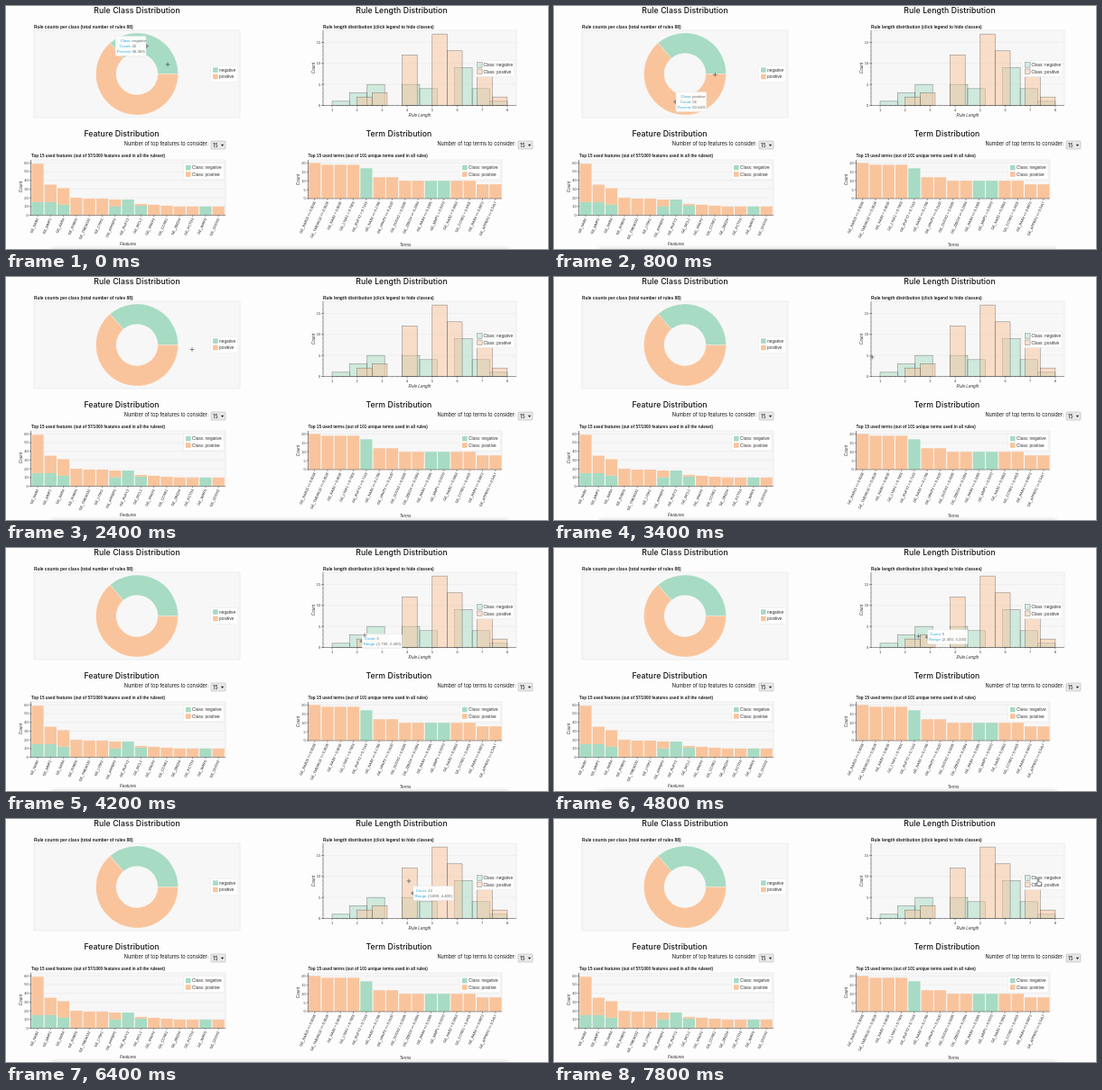
Animation, 600 px wide and 270 px high, one loop 8 s. Source, as an HTML page:

```html
<!DOCTYPE html>
<html lang="en">
<head>
<meta charset="utf-8">
<title>Rule statistics</title>
<style>
html, body { margin: 0; width: 100%; height: 100%; overflow: hidden; background: #fdfdfd; }
svg { display: block; width: 600px; height: 270px; }
text { font: 4.75px "Liberation Sans", Arial, sans-serif; fill: #333; }
.head { font: 500 8.7px Inter, "Open Sans", sans-serif; letter-spacing: .08px; fill: #111; text-anchor: middle; }
.ask { font: 5.55px Inter, "Open Sans", sans-serif; fill: #111; text-anchor: end; }
.pick { font: 5.6px Inter, "Open Sans", sans-serif; fill: #111; }
.sub { font-weight: bold; font-size: 4.85px; fill: #222; }
.small { font-weight: bold; font-size: 4.6px; fill: #222; }
.axis { font-style: italic; font-size: 4.6px; text-anchor: middle; }
.tick { font-size: 4px; text-anchor: end; }
.mid { font-size: 4px; text-anchor: middle; }
.name { font-size: 3.85px; fill: #111; text-anchor: end; }
.key { font-size: 4.3px; fill: #26aae1; text-anchor: end; }
.val { font-size: 4.3px; fill: #666; }
</style>
</head>
<body>
<svg id="stage" viewBox="0 0 600 270"></svg>
<script>
const GREEN = "#a7dbc3", ORANGE = "#f9c49c", PANEL = "#f7f7f7", RULE = "#e4e4e4", INK = "#444";
const CLASSES = ["Class: negative", "Class: positive"];
const stage = document.getElementById("stage");

function add(tag, attrs, parent = stage) {
  const el = document.createElementNS("http://www.w3.org/2000/svg", tag);
  for (const k in attrs) el.setAttribute(k, attrs[k]);
  return parent.appendChild(el);
}
function label(str, x, y, cls = "", parent = stage, turn = 0) {
  add("text", { x, y, class: cls, transform: `rotate(${turn} ${x} ${y})` }, parent).textContent = str;
}
function box(x, y, width, height, fill, more = {}, parent = stage) {
  add("rect", { x, y, width, height, fill, ...more }, parent);
}
function line(x1, y1, x2, y2, stroke = INK, width = 0.5) {
  add("line", { x1, y1, x2, y2, stroke, "stroke-width": width });
}
// Straight interpolation through points of the form [position, value, value...]
function along(points, at) {
  const i = points.findIndex(p => p[0] > at);
  if (i < 0) return points[points.length - 1].slice(1);
  const a = points[i - 1], b = points[i], k = (at - a[0]) / (b[0] - a[0]);
  return a.slice(1).map((v, j) => v + (b[j + 1] - v) * k);
}
function seeded(seed) {
  return () => (seed = seed * 16807 % 2147483647) / 2147483647;
}

function panel(x, y, w, h) {
  box(x, y, w, h, PANEL, { stroke: RULE, "stroke-width": 0.6 });
}
function legend(x, y, w, names, more = {}) {
  box(x, y, w, 18, "#fff", { "fill-opacity": 0.95, stroke: RULE, "stroke-width": 0.4 });
  names.forEach((name, i) => {
    box(x + 2.5, y + 2 + i * 7.4, 5.6, 5.6, i ? ORANGE : GREEN, more);
    label(name, x + 9.6, y + 6.5 + i * 7.4);
  });
}
// Vertical scale: grid, labelled ticks and small ticks between them
function scaleY(x, right, top, base, unit, step, max) {
  for (let v = 0; v <= max; v += step) {
    const y = base - v * unit;
    if (v) line(x, y, right, y, RULE);
    line(x - 2, y, x + 1, y);
    label(v, x - 2.8, y + 1.4, "tick");
  }
  for (let y = base; y > top; y -= step / 5 * unit) line(x - 1, y, x, y, INK, 0.3);
}
function frame(x, top, right, base) {
  line(x, top, x, base);
  line(x, base, right, base);
}
function chooser(str, x) {
  label(str, x - 2.5, 155.1, "ask");
  box(x, 150, 16, 9, "#e9e9e9", { stroke: "#aaa", "stroke-width": 0.5, rx: 0.8 });
  label("15", x + 2, 156.5, "pick");
  add("path", { d: `M${x + 10.8} 153.8h3.4l-1.7 2.2z`, fill: "#222" });
}

// Donut
const ring = { x: 145, y: 75.5, out: 45.5, in: 23 };
const split = 32 / 88 * 2 * Math.PI;
const polar = (r, a) => `${ring.x + r * Math.cos(a)} ${ring.y - r * Math.sin(a)}`;
function wedge(a, b, fill) {
  const big = b - a > Math.PI ? 1 : 0;
  add("path", {
    d: `M${polar(ring.out, a)}A${ring.out} ${ring.out} 0 ${big} 0 ${polar(ring.out, b)}` +
       `L${polar(ring.in, b)}A${ring.in} ${ring.in} 0 ${big} 1 ${polar(ring.in, a)}Z`,
    fill, stroke: "#fff", "stroke-width": 0.25
  });
}
label("Rule Class Distribution", 145, 7.5, "head");
label("Rule counts per class (total number of rules 88)", 31, 25, "sub");
panel(31, 27, 228, 97);
wedge(0, split, GREEN);
wedge(split, 2 * Math.PI, ORANGE);
legend(226.5, 66.3, 30, ["negative", "positive"]);

// Rule length histogram
const hist = { left: 351, right: 565, top: 27, base: 110.5, unit: 4.67, middle: 458 };
const histX = v => 361 + (v - 1) * 27.7;
const bins = [];
const outline = { "fill-opacity": 0.5, stroke: "#333", "stroke-opacity": 0.6, "stroke-width": 0.5 };
function histogram(start, step, counts, fill) {
  counts.forEach((n, i) => {
    if (!n) return;
    const from = start + i * step, to = from + step;
    const b = { n, from, to, x: histX(from), w: step * 27.7, h: n * hist.unit };
    b.y = hist.base - b.h;
    bins.push(b);
    box(b.x, b.y, b.w, b.h, fill, outline);
  });
}
label("Rule Length Distribution", 438, 7.5, "head");
label("Rule length distribution (click legend to hide classes)", 351, 25, "sub");
panel(hist.left, hist.top, 214, 83.5);
scaleY(hist.left, hist.right, hist.top, hist.base, hist.unit, 5, 15);
histogram(1, 0.7, [1, 3, 5, 0, 5, 4, 0, 9, 4, 1], GREEN);
histogram(2, 0.6, [2, 3, 0, 12, 0, 17, 13, 0, 7, 2], ORANGE);
frame(hist.left, hist.top, hist.right, hist.base);
for (let i = 5; i <= 40; i++) {
  const x = histX(i / 5), whole = i % 5 === 0;
  line(x, hist.base, x, hist.base + (whole ? 2 : 1), INK, whole ? 0.5 : 0.3);
  if (whole) label(i / 5, x, 117, "mid");
}
label("Count", 341.5, 69, "axis", stage, -90);
label("Rule Length", hist.middle, 122.9, "axis");
legend(519, 60.6, 43.5, CLASSES, outline);

// Ranked bars: totals follow a curve, green(i) gives the green part
function bars(x, base, unit, curve, green, names) {
  const pitch = 14.3;
  names.forEach((name, i) => {
    const n = Math.floor(along(curve, i)[0] + 1e-6), g = Math.min(n, green(i));
    const left = x + 0.6 + i * pitch, mid = x + (i + 0.5) * pitch;
    box(left, base - n * unit, pitch - 1.1, (n - g) * unit, ORANGE);
    box(left, base - g * unit, pitch - 1.1, g * unit, GREEN);
    line(mid, base, mid, base + 2);
    label("GE_" + name, mid + 1.2, base + 4, "name", stage, -66);
  });
}

label("Feature Distribution", 128, 145.3, "head");
chooser("Number of top features to consider:", 227);
label("Top 15 used features (out of 57/1000 features used in all the ruleset)", 28, 168.3, "small");
panel(27.5, 171, 215.5, 61.5);
scaleY(27.5, 243, 171, 232.5, 0.97, 10, 60);
const features = "NAB2 MMP1 RAB4 RAB25 TMEM132 LY6K1 APPBP2 RUFY2 MCL1 VRKP2 CCNE1 ZBED4 KCTD3 WARS DUOX2".split(" ");
const shared = { NAB2: 15, MMP1: 15, RAB4: 12, APPBP2: 10, RUFY2: 18, MCL1: 11, WARS: 10 };
bars(27.8, 232.5, 0.97,
  [[0, 59], [1, 35], [2, 31], [3, 20], [7, 18], [8, 13], [11, 10]],
  i => shared[features[i]] || 0, features);
frame(27.5, 171, 243, 232.5);
label("Count", 18, 201, "axis", stage, -90);
label("Features", 135, 266.3, "axis");
legend(196.5, 174.8, 44.5, CLASSES);

label("Term Distribution", 435, 145.3, "head");
chooser("Number of top terms to consider:", 567);
label("Top 15 used terms (out of 101 unique terms used in all rules)", 334.5, 168.3, "small");
panel(334.5, 171, 214.5, 43);
scaleY(334.5, 549, 171, 214, 1.98, 5, 20);
const random = seeded(35);
const terms = "RAB25 TMEM132 NAB2 LY6K1 RUFY2 NAB2 VRKP2 DUOX2 ZBED4 RAB4 MMP1 NAB2 CCNE1 RAB4 APPBP2".split(" ")
  .map(gene => `${gene} ${random() < 0.6 ? "<=" : ">"} ${random().toFixed(4)}`);
bars(334.5, 214, 1.98,
  [[0, 20], [3, 19], [4, 17], [5, 12], [6, 12], [7, 10], [12, 10], [13, 8]],
  i => [4, 9, 10].includes(i) ? Infinity : 0, terms);
frame(334.5, 171, 549, 214);
label("Count", 324.5, 193, "axis", stage, -90);
label("Terms", 442, 266.8, "axis");
legend(502.5, 174.8, 44.5, CLASSES);

// Soft shade along the bottom edge
box(50, 269, 506, 4, "#000", { opacity: 0.13, style: "filter: blur(2px)" });

// Pointer and tooltips
const tips = add("g", {});
const cross = add("path", { d: "M-2.4 0H2.4M0 -2.4V2.4", stroke: "#333", "stroke-width": 0.55 });
const hand = add("path", {
  d: "M-.8 -2.6q.8-.8 1.5 0v2.2l2.4.6q.8.3.7 1.2l-.5 2.8h-4l-2-2.6q.3-1 1.2-.4l.7.6z",
  fill: "#fff", stroke: "#222", "stroke-width": 0.6
});

function tooltip(x, y, rows, width, keyWidth, toLeft) {
  const h = rows.length * 6 + 4, left = toLeft ? x - 4 - width : x + 4;
  const dir = toLeft ? -1 : 1;
  box(left, y - h / 2, width, h, "#fff", { "fill-opacity": 0.92, stroke: "#ddd", "stroke-width": 0.4, rx: 1.5 }, tips);
  add("path", { d: `M${x + dir} ${y}l${dir * 3} -2.6v5.2z`, fill: "#858a8e" }, tips);
  rows.forEach(([k, v], i) => {
    const ty = y + 1.5 + (i - (rows.length - 1) / 2) * 6;
    label(k + ":", left + keyWidth, ty, "key", tips);
    label(v, left + keyWidth + 0.7, ty, "val", tips);
  });
}
function hover(x, y) {
  const dx = x - ring.x, dy = ring.y - y, r = Math.hypot(dx, dy);
  if (r > ring.in && r < ring.out) {
    const neg = (Math.atan2(dy, dx) + 2 * Math.PI) % (2 * Math.PI) < split;
    const mid = neg ? split / 2 : split / 2 + Math.PI, count = neg ? 32 : 56;
    const rows = [["Class", neg ? "negative" : "positive"], ["Count", count],
                  ["Percent", (count / 88 * 100).toFixed(2) + "%"]];
    tooltip(ring.x + 34 * Math.cos(mid), ring.y - 34 * Math.sin(mid), rows, 34, 17.6, neg);
  }
  for (const b of bins) {
    if (x < b.x || x > b.x + b.w || y < b.y || y > hist.base) continue;
    const mid = b.x + b.w / 2;
    const range = `(${b.from.toFixed(3)}, ${b.to.toFixed(3)})`;
    tooltip(mid, b.y + b.h / 2, [["Count", b.n], ["Range", range]], 44.5, 15.5, mid > hist.middle);
  }
}

// Pointer path: time, x, y
const path = [
  [0, 179, 65], [1200, 178, 82], [1800, 178, 82], [2400, 206, 80.5], [3000, 330, 85],
  [4200, 397, 97], [5600, 412, 99.5], [6400, 446, 69], [7000, 447, 69], [7800, 536, 70]
];
const LOOP = 8000, STEP = 200;
const begin = performance.now();
let shown = -1;
function draw() {
  const t = Math.floor((performance.now() - begin) % LOOP / STEP) * STEP;
  if (t !== shown) {
    shown = t;
    const [x, y] = along(path, t);
    const onLegend = x > 519 && x < 562.5 && y > 60 && y < 79;
    tips.replaceChildren();
    hover(x, y);
    for (const el of [cross, hand]) el.setAttribute("transform", `translate(${x} ${y})`);
    cross.style.display = onLegend ? "none" : "";
    hand.style.display = onLegend ? "" : "none";
  }
  requestAnimationFrame(draw);
}
draw();
</script>
</body>
</html>
```
